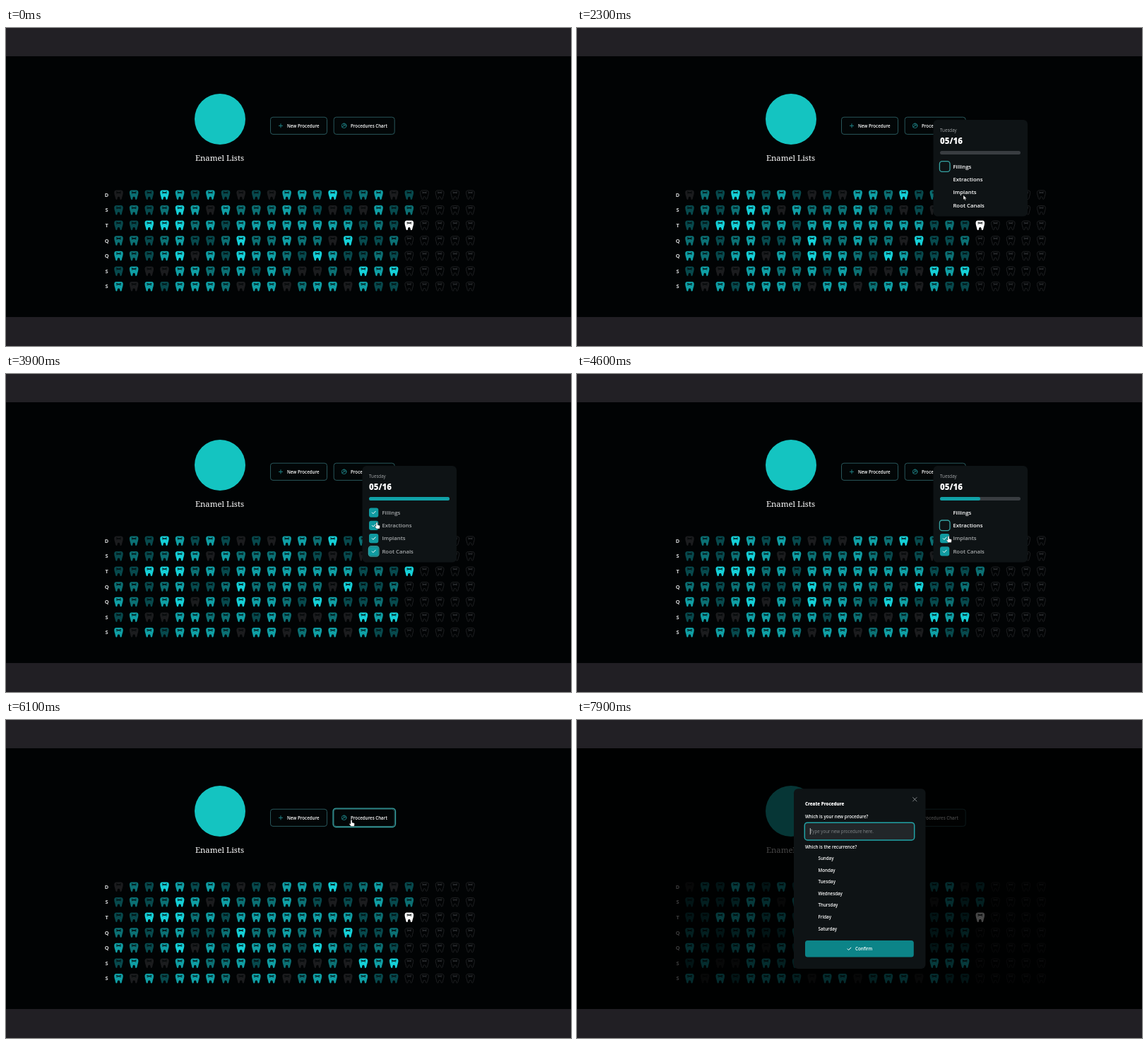
An HTML page that plays this animation: 800x450 px, repeating every 8000 ms.

```html
<!DOCTYPE html>
<html lang="en">
<head>
<meta charset="utf-8">
<title>Procedure tracker</title>
<style>
  html, body { margin: 0; width: 100%; height: 100%; overflow: hidden; background: #010304; }
  svg { display: block; width: 100vw; height: 100vh; }
  text { font: 600 6.2px "Open Sans", "Noto Sans", sans-serif; fill: #fff; white-space: pre; }
  .brand { font: 400 11.4px "Noto Serif", serif; text-anchor: middle; }
  .day { font-weight: 700; font-size: 7.4px; fill: #d8dadb; text-anchor: middle; }
  .title { font-weight: 800; }
  .hint { font-weight: 400; fill: #85898c; }
  .item { font-size: 7.8px; }
  .done .item { fill: #a6a9ab; }
  .date { font-weight: 800; font-size: 11.5px; }
  .pct { font: 700 6px "Liberation Sans", Arial, sans-serif; text-anchor: middle; paint-order: stroke; stroke: #0006; stroke-width: .8px; }
  .legend { font: 400 5.8px "Liberation Sans", Arial, sans-serif; }
  .line { fill: none; stroke-linecap: round; stroke-linejoin: round; }
  .border { fill: #020607; stroke: #2d6065; stroke-width: .9; }
  .ring { fill: none; stroke: #36a3a3; stroke-width: 1.3; }
  .panel { fill: #0e1315; }
  .tick { display: none; }
  .done .tick { display: inline; }
</style>
</head>
<body>
<svg id="stage" viewBox="0 0 800 450" preserveAspectRatio="none">
  <defs>
    <path id="shape" d="M-3.4-6.6H3.4C5.4-6.6 6.4-5 6.3-3C6.2 0 5 2 4.6 4.6C4.4 6.2 3.8 6.9 3 6.9C1.8 6.9 2 5.6 1.6 3.9C1.2 2.4-1.2 2.4-1.6 3.9C-2 5.6-1.8 6.9-3 6.9C-3.8 6.9-4.4 6.2-4.6 4.6C-5 2-6.2 0-6.3-3C-6.4-5-5.4-6.6-3.4-6.6Z"/>
    <path id="bow" class="line" stroke-width="1.1" d="M-3-4.1L2.8-2.1M3-4.1L-2.8-2.1"/>
    <path id="check" class="line" d="M-2.4.1L-.8 1.7L2.5-1.7"/>
    <path id="cross" class="line" d="M-2.7-2.7L2.7 2.7M2.7-2.7L-2.7 2.7"/>
  </defs>
  <rect width="800" height="450" fill="#010304"/>
  <circle cx="303" cy="129" r="36" fill="#14c4c1"/>
  <text class="brand" x="302.5" y="188">Enamel Lists</text>

  <rect class="border" x="374.5" y="126.2" width="80" height="24.2" rx="3.5"/>
  <path class="line" stroke="#1f8084" d="M386.4 138.3h5.2M389 135.7v5.2"/>
  <text x="398" y="140.6">New Procedure</text>
  <rect class="ring" id="newRing" x="373.4" y="125.1" width="82.4" height="26.4" rx="4.2"/>

  <rect class="border" x="464.2" y="126.2" width="86" height="24.2" rx="3.5"/>
  <g class="line" stroke="#1f8084" stroke-width=".9">
    <circle cx="478.7" cy="138.3" r="3.3"/>
    <path d="M478.7 138.3V135M478.7 138.3L481.5 136.6M478.7 138.3L475.8 140"/>
  </g>
  <text x="488" y="140.6">Procedures Chart</text>
  <rect class="ring" id="chartRing" x="463.1" y="125.1" width="88.4" height="26.4" rx="4.2"/>

  <g id="grid"></g>

  <g id="popover">
    <rect class="panel" x="504.5" y="130" width="133.5" height="136.5" rx="6"/>
    <text x="514" y="147.4" style="font-weight:400;fill:#a4a7a9">Tuesday</text>
    <text class="date" x="514" y="164.2">05/16</text>
    <rect x="514" y="174" width="114" height="5" rx="2.5" fill="#393d41"/>
    <rect id="bar" x="514" y="174" height="5" rx="2.5" fill="#11a2a8"/>
    <g id="items"></g>
  </g>

  <rect id="dim" y="40" width="800" height="369" fill="#000" opacity=".72"/>

  <g id="chart">
    <rect class="panel" x="260" y="107.3" width="280" height="235.4" rx="6"/>
    <text class="title" x="277" y="130.3">Most performed procedures.</text>
    <rect class="ring" x="518.9" y="115.8" width="12.4" height="12.4" rx="3.6"/>
    <use href="#cross" x="525" y="122" stroke="#c9cdce" stroke-width=".9"/>
    <g id="slices" stroke="#fff" stroke-width="1"></g>
    <g id="labels"></g>
    <g id="legend"></g>
  </g>

  <g id="create">
    <rect class="panel" x="307" y="97.3" width="186.5" height="254.7" rx="6"/>
    <use href="#cross" x="478.3" y="112.3" stroke="#8f9496" stroke-width=".9"/>
    <text class="title" x="323" y="120.5">Create Procedure</text>
    <text x="323" y="138.9">Which is your new procedure?</text>
    <rect x="322.3" y="145.2" width="155.4" height="24.8" rx="4" fill="#222629" stroke="#22a3a6" stroke-width="1.5"/>
    <text class="hint" x="330" y="159.8">Type your new procedure here.</text>
    <path id="caret" d="M330.3 153v9" stroke="#fff" stroke-width=".7"/>
    <text x="323" y="182.2">Which is the recurrence?</text>
    <g id="days"></g>
    <rect x="323" y="312" width="153.8" height="23.4" rx="3.5" fill="#0c8488"/>
    <use href="#check" x="385.4" y="323.8" stroke="#fff"/>
    <text x="394" y="326">Confirm</text>
  </g>

  <g id="cursor" fill="#fff" stroke="#111" stroke-width=".4">
    <path id="arrow" d="M0 0V6.6L1.5 5.2L2.5 7.4L3.5 7L2.6 4.9H4.7Z"/>
    <path id="hand" d="M-1 .8a1 1 0 0 1 2 0V3.6l2.6.6q1 .3.9 1.4l-.5 3.4h-4.4l-2.6-3.2q.4-1.3 2-.2z"/>
  </g>

  <rect width="800" height="40" fill="#222025"/>
  <rect y="409" width="800" height="41" fill="#211f24"/>
</svg>
<script>
const LOOP = 8000, STEP = 100;
const $ = id => document.getElementById(id);
const show = (id, on) => $(id).style.display = on ? '' : 'none';
const clamp = v => Math.max(0, Math.min(1, v));
const within = (t, spans) => spans.some(([a, b]) => t >= a && t < b);

// One digit per day: the level of completion; "w" is today.
const levels = [
  '02143131010332412301', '12124303222321010312', '1144423133333333121w',
  '2212311242232204112', '3213403143321431121', '1300332231320020434',
  '3031333203302330311'
];
const tones = ['#1b1c1e', '#07494d', '#0b7074', '#0f9fa5', '#15d0d8'];

function tooth(x, y, level) {
  if (level === undefined)
    return `<g transform="translate(${x} ${y})" class="line" stroke="#2a2c2f" stroke-width=".8" stroke-dasharray="2.6 .7"><use href="#shape" transform="scale(.93)"/><use href="#bow"/></g>`;
  const today = level === 'w';
  return `<g transform="translate(${x} ${y})"><use href="#shape" ${today ? 'id="today"' : ''} fill="${today ? '#fff' : tones[level]}"/><use href="#bow" stroke="#020607"/></g>`;
}

$('grid').innerHTML = levels.map((row, r) => {
  const y = 236 + r * 21.6;
  const teeth = Array.from({ length: 24 }, (_, c) => tooth(159.5 + c * 21.65, y, row[c]));
  return `<text class="day" x="142.6" y="${y + 2.8}">${'DSTQQSS'[r]}</text>` + teeth.join('');
}).join('');

const items = [
  { name: 'Fillings', clicks: [2500, 4000] },
  { name: 'Extractions', clicks: [2800, 4300] },
  { name: 'Implants', clicks: [3000, 4800] },
  { name: 'Root Canals', clicks: [3500, 5000] }
];
$('items').innerHTML = items.map(({ name }, i) => {
  const y = 196 + i * 18.3;
  return `<g><g class="tick"><rect x="514" y="${y - 6.6}" width="13.3" height="13.3" rx="3" fill="#109aa0"/>
    <use href="#check" x="520.7" y="${y}" stroke="#fff"/></g>
    <rect class="ring" x="513.4" y="${y - 7.3}" width="14.6" height="14.6" rx="3.6"/>
    <text class="item" x="532.4" y="${y + 2.8}">${name}</text></g>`;
}).join('');

$('days').innerHTML = ['Sun', 'Mon', 'Tues', 'Wednes', 'Thurs', 'Fri', 'Satur']
  .map((d, i) => `<text x="341.5" y="${198 + i * 16.62}">${d}day</text>`).join('');

const shares = [
  { name: 'Extractions', part: .4, color: '#0085fb', at: [439.5, 215.6] },
  { name: 'Fillings', part: .3, color: '#06c491', at: [353, 302.3] },
  { name: 'Implants', part: .1, color: '#ffac0c', at: [305.3, 237] },
  { name: 'Root Canals', part: .2, color: '#fd525c', at: [333.3, 181.4] }
];
$('slices').innerHTML = shares.map(s => `<path fill="${s.color}"/>`).join('');
$('labels').innerHTML = shares.map(s =>
  `<text class="pct" x="${s.at[0]}" y="${s.at[1]}">${s.part * 100}.0%</text>`).join('');
$('legend').innerHTML = shares.map((s, i) => {
  const y = 164.2 + i * 10.45;
  return `<circle cx="479.4" cy="${y}" r="2.7" fill="${s.color}"/><text class="legend" x="483" y="${y + 2.1}">${s.name}</text>`;
}).join('');

function wedge(from, to) {
  const point = (turn, r) => {
    const a = turn * 2 * Math.PI;
    return `${374 + r * Math.sin(a)} ${236.7 - r * Math.cos(a)}`;
  };
  const big = to - from > .5 ? 1 : 0;
  return `M${point(from, 83.5)}A83.5 83.5 0 ${big} 1 ${point(to, 83.5)}L${point(to, 54)}A54 54 0 ${big} 0 ${point(from, 54)}Z`;
}

function drawChart(t) {
  const grown = 1 - (1 - clamp((t - 6200) / 500)) ** 2;
  let start = 0;
  shares.forEach((s, i) => {
    const end = Math.min(start + s.part, grown);
    $('slices').children[i].setAttribute('d', end > start ? wedge(start, end) : '');
    start += s.part;
  });
  show('labels', grown === 1);
}

function drawItems(t) {
  let progress = 0, count = 0, focus = 0, last = 0;
  items.forEach(({ clicks }, i) => {
    const [on, off] = clicks;
    const done = t >= on && t < off;
    count += done;
    progress += clamp((t - on) / 150) - clamp((t - off) / 150);
    for (const c of clicks) if (c <= t && c > last) { last = c; focus = i; }
    $('items').children[i].setAttribute('class', done ? 'done' : '');
  });
  document.querySelectorAll('#items .ring').forEach((r, i) => r.style.display = i === focus ? '' : 'none');
  $('bar').setAttribute('width', progress * 28.5);
  $('today').setAttribute('fill', count ? tones[count] : '#fff');
}

// Pointer path: time, x, y.
const path = [
  [200, 425, 185], [400, 418, 139], [800, 440, 160], [1100, 478, 112], [1200, 478, 112],
  [1500, 568.7, 225], [1800, 570, 277], [2100, 570, 277], [2500, 524, 196], [2800, 525, 214],
  [3000, 525, 232.5], [3250, 525, 232.5], [3500, 525, 250], [3700, 525, 250], [4000, 525, 196],
  [4300, 525, 214], [4600, 526, 229.5], [4800, 526, 232], [5000, 525, 250], [5300, 470, 215],
  [5800, 489, 141.5], [6200, 489, 141.5], [6500, 492, 146], [7100, 523, 123.5], [7350, 523, 123.5],
  [7700, 415, 139], [8000, 415, 139]
];
const handTimes = [[350, 500], [1050, 1250], [1700, 2200], [2450, 5100], [5700, 6300], [7000, 7400], [7600, 7800]];

function drawCursor(t) {
  show('cursor', within(t, [[200, 500], [800, 7800]]));
  const i = Math.max(1, path.findIndex(p => p[0] > t));
  const [a, x0, y0] = path[i - 1], [b, x1, y1] = path[i];
  const k = clamp((t - a) / (b - a)), e = k * k * (3 - 2 * k);
  $('cursor').setAttribute('transform', `translate(${x0 + (x1 - x0) * e} ${y0 + (y1 - y0) * e})`);
  const hand = within(t, handTimes);
  show('hand', hand);
  show('arrow', !hand);
}

function draw(t) {
  const create = within(t, [[500, 1200], [7800, LOOP]]);
  const chart = within(t, [[6200, 7400]]);
  show('create', create);
  show('chart', chart);
  show('dim', create || chart);
  show('popover', within(t, [[2000, 5300]]));
  show('newRing', within(t, [[400, 500], [1200, 2000]]));
  show('chartRing', within(t, [[6000, 6200], [7400, 7700]]));
  show('caret', within(t, [[500, 1000], [7800, LOOP]]));
  drawItems(t);
  drawChart(t);
  drawCursor(t);
}

const begin = performance.now();
function tick() {
  const t = (performance.now() - begin) % LOOP;
  draw(Math.floor(t / STEP) * STEP);
  requestAnimationFrame(tick);
}
tick();
</script>
</body>
</html>
```
